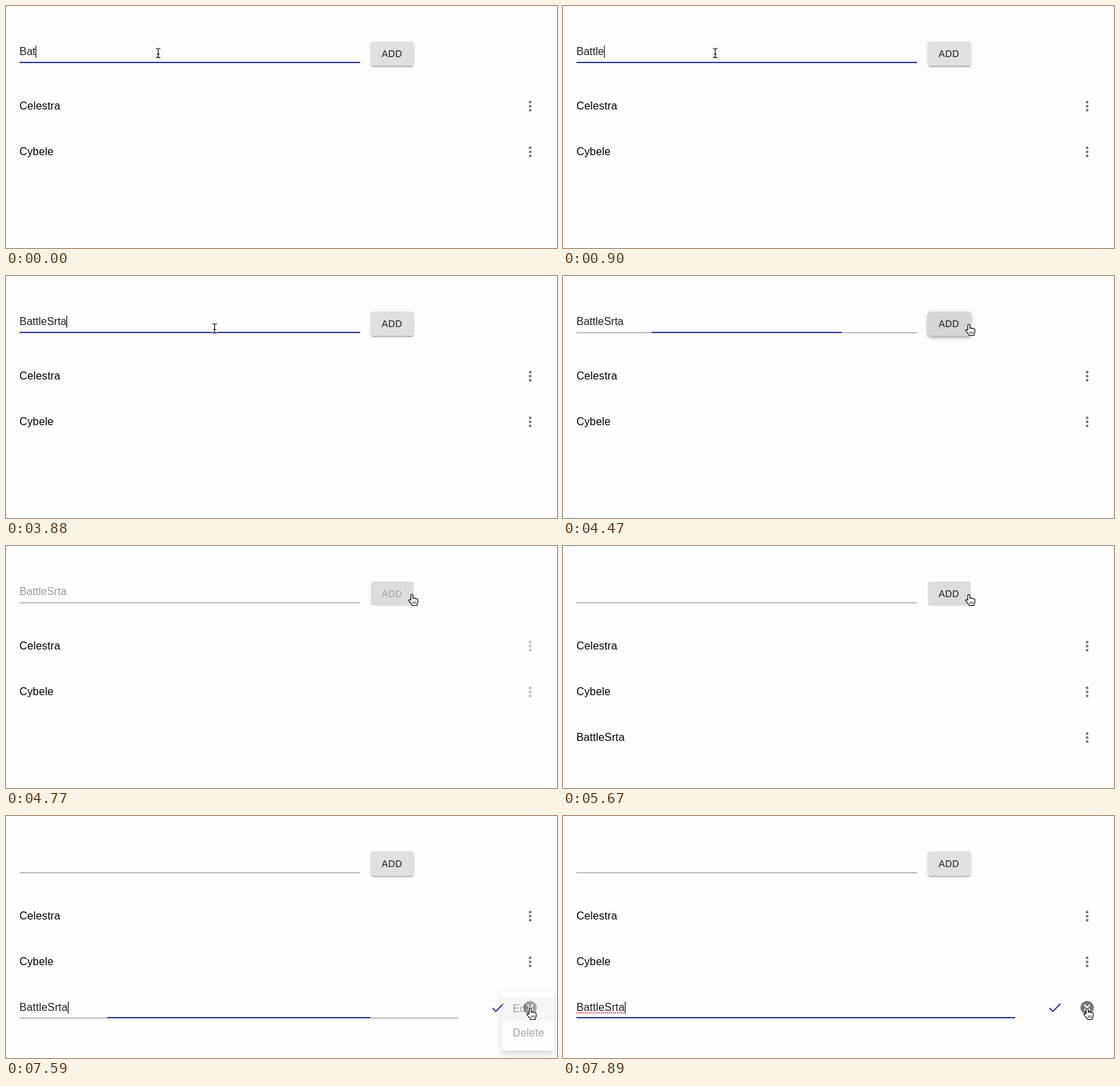
Animation, 820 px wide and 360 px high, one loop 8 s. Source, as an HTML page:

```html
<!DOCTYPE html>
<html lang="en">
<head>
<meta charset="utf-8">
<title>Editable list</title>
<style>
  html, body { margin: 0; width: 100%; height: 100%; overflow: hidden; background: #fdfdfd; }
  #stage { position: relative; width: 820px; height: 360px; overflow: hidden; }
  #stage, svg text { font: 16px "Liberation Sans", Arial, sans-serif; }
  svg { position: absolute; left: 0; top: 0; }
  .row, .item { letter-spacing: .15px; }
  .button {
    position: absolute; left: 543px; top: 53px; width: 64px; height: 36px; border-radius: 4px;
    background: #e0e0e0;
    box-shadow: 0 3px 1px -2px rgba(0,0,0,.2), 0 2px 2px rgba(0,0,0,.14), 0 1px 5px rgba(0,0,0,.12);
  }
  .button.hover {
    background: #d5d5d5;
    box-shadow: 0 2px 4px -1px rgba(0,0,0,.2), 0 4px 5px rgba(0,0,0,.14), 0 1px 10px rgba(0,0,0,.12);
  }
  .button.flat { background: #dcdcdc; box-shadow: none; }
  svg .add { font-size: 14px; letter-spacing: .4px; }
  .menu {
    position: absolute; left: 738px; top: 261px; width: 78px; height: 72px; padding: 8px 0;
    border-radius: 4px; background: #fff; color: rgba(0,0,0,.87); transform-origin: 42px 24px;
    box-shadow: 0 5px 5px -3px rgba(0,0,0,.2), 0 8px 10px 1px rgba(0,0,0,.14), 0 3px 14px 2px rgba(0,0,0,.12);
  }
  .item { height: 36px; line-height: 36px; padding-left: 16px; }
  .item.hover { background: rgba(0,0,0,.08); }
</style>
</head>
<body>
<div id="stage"></div>
<script>
const LOOP = 8000, TICK = 149;   // the screen refreshes once per tick
const BLUE = '#303f9f', INK = 'rgba(0,0,0,.87)', ICON = 'rgba(0,0,0,.54)', DIM = 'rgba(0,0,0,.26)';
const NAME = 'BattleSrta';
const stage = document.getElementById('stage');
const pen = document.createElement('canvas').getContext('2d');
pen.font = '16px "Liberation Sans", Arial, sans-serif';

// [tick, number of typed letters]
const typing = [[0, 3], [3, 4], [5, 5], [6, 6], [11, 7], [19, 8], [21, 9], [23, 10], [38, 0]];
// [tick, cursor shape, x, y]
const moves = [
  [0, 'beam', 226, 70], [26, 'beam', 310, 78], [27, 'beam', 450, 72], [28, 'hand', 560, 58],
  [29, 'hand', 600, 70], [30, 'hand', 604, 72], [42, 'arrow', 640, 112], [43, 'arrow', 712, 196],
  [44, 'hand', 768, 270], [45, 'hand', 780, 286]
];
const cursors = {
  beam: `<g fill="none" stroke-linecap="square">${[['#fff', 2.4], ['#000', 1.1]].map(([color, width]) =>
    `<path d="M-2.5-7Q0-7 .5-5.5Q1-7 3.5-7M.5-5.5V5.5M-2.5 7Q0 7 .5 5.5Q1 7 3.5 7M-1 1.5H2" stroke="${color}" stroke-width="${width}"/>`).join('')}</g>`,
  hand: `<path d="M-1.5 8.5V1.5a1.5 1.5 0 0 1 3 0V6c.4-.9 2.4-.9 2.7.3c.5-.8 2.2-.6 2.5.5c.6-.6 2.3-.4 2.3 1.2V11
    c0 2-1.2 2.8-1.3 5.5H.5c-.5-2-3.5-4-5-6.8c-.9-1.6 1-2.4 2-1.4z" fill="#fff" stroke="#000" stroke-width="1.1" stroke-linejoin="round"/>
    <path d="M1.7 10.5v3.5M3.9 10.5v3.5M6.1 10.5v3.5" stroke="#000" stroke-width=".8"/>`,
  arrow: `<path d="M0 0V14.5L3.4 11.3L5.8 17L8.2 16L5.8 10.4H10.4Z" stroke="#fff"/>`
};

const latest = (keys, tick) => keys.filter(key => key[0] <= tick).pop();
const within = (tick, from, to) => tick >= from && tick < to;
const text = (label, x, y, cls, color) =>
  `<text x="${x}" y="${y}" class="${cls}" fill="${color}">${label}</text>`;
const rect = (x, y, w, h, color) => `<rect x="${x}" y="${y}" width="${w}" height="${h}" fill="${color}"/>`;
const dots = (y, color) => [-6, 0, 6].map(dy => `<circle cx="780" cy="${y + dy}" r="2" fill="${color}"/>`).join('');

// Thin grey rule with a blue focus rule that grows from the middle.
function underline(y, width, focus) {
  const blue = width * focus;
  return rect(20, y - 1, width, 1, 'rgba(0,0,0,.42)') +
    (blue ? rect(20 + (width - blue) / 2, y - 2, blue, 2, BLUE) : '');
}

function caret(label, top, spacing = 0) {
  const x = Math.round(20 + pen.measureText(label).width + spacing * label.length);
  return rect(x, top, 1, 18, '#000');
}

function newRow(tick) {
  if (tick < 38) return '';
  if (tick < 51) return text(NAME, 20, 290, 'row', '#000') +
    (tick >= 45 ? '<circle cx="780" cy="285" r="24" fill="rgba(0,0,0,.075)"/>' : '') + dots(285, ICON);
  return text(NAME, 20, 290, 'row', INK) + underline(301, 653, tick === 51 ? .6 : 1) +
    caret(NAME, 276, .15) +
    (tick >= 53 ? '<path d="M20 292.7H92" stroke="#f4605c" stroke-width="2" stroke-dasharray="2 1"/>' : '') +
    `<path d="M729 289.17L724.83 285l-1.42 1.41L729 292l12-12-1.41-1.41z" fill="${BLUE}"/>
     <circle cx="780" cy="285" r="10" fill="#757575"/>
     <path d="M775.7 280.7l8.6 8.6m0-8.6l-8.6 8.6" stroke="#fdfdfd" stroke-width="2"/>`;
}

function menu(tick) {
  if (!within(tick, 47, 52)) return '';
  const opacity = tick === 47 ? .7 : tick === 51 ? .4 : 1;
  const scale = tick === 47 ? .9 : 1;
  return `<div class="menu" style="opacity:${opacity};transform:scale(${scale})">
    <div class="item hover">Edit</div><div class="item">Delete</div></div>`;
}

function draw(tick) {
  const typed = NAME.slice(0, latest(typing, tick)[1]);
  const saving = within(tick, 31, 38);
  const caretOn = tick < 27 && tick !== 10 && !within(tick, 14, 18);
  const focus = tick < 30 ? 1 : tick === 30 ? .558 : 0;
  const look = within(tick, 31, 39) ? 'flat' : within(tick, 28, 42) ? 'hover' : '';
  const dotColor = saving ? DIM : ICON;
  const [, shape, x, y] = latest(moves, tick);
  const layer = content => `<svg width="820" height="360">${content}</svg>`;

  stage.innerHTML = `<div class="button ${look}"></div>` + layer(
    text('ADD', 559, 76, 'add', saving ? DIM : INK) +
    text(typed, 20, 73, '', saving ? 'rgba(0,0,0,.38)' : INK) +
    (caretOn ? caret(typed, 59) : '') +
    underline(85, 507, focus) +
    text('Celestra', 20, 154, 'row', '#000') + dots(149, dotColor) +
    text('Cybele', 20, 222, 'row', '#000') + dots(217, dotColor) +
    newRow(tick)
  ) + menu(tick) + layer(`<g transform="translate(${x} ${y})">${cursors[shape]}</g>`);
}

let shown = -1;
function frame() {
  const tick = Math.floor((performance.now() % LOOP + 8) / TICK);
  if (tick !== shown) draw(shown = tick);
  requestAnimationFrame(frame);
}
frame();
</script>
</body>
</html>
```
